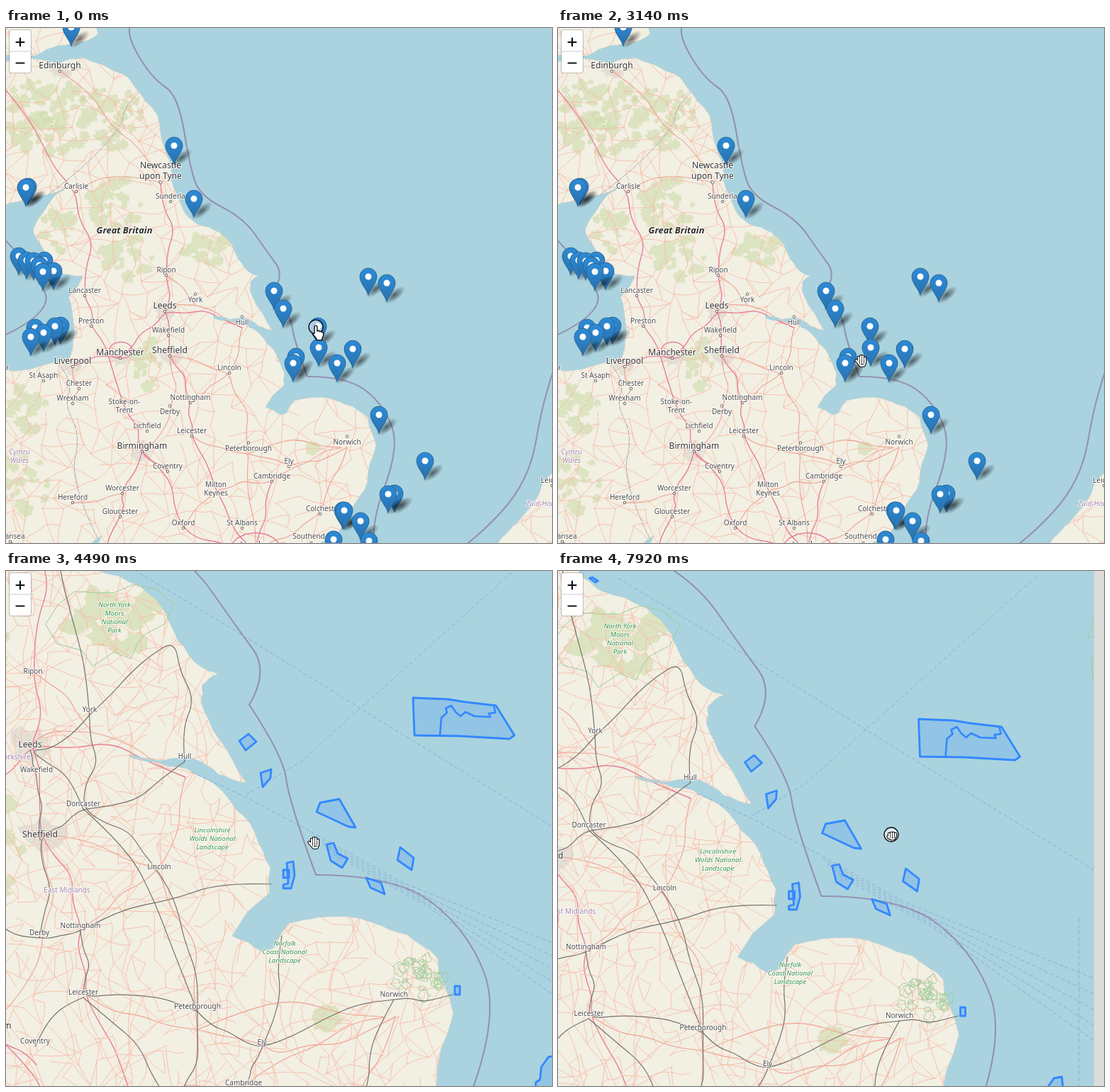
An HTML page that plays this animation: 770x727 px, repeating every 8000 ms.

```html
<!DOCTYPE html>
<html lang="en">
<head>
<meta charset="utf-8">
<title>Wind farm map</title>
<style>
html, body { margin: 0; width: 100%; height: 100%; overflow: hidden; background: #aad3df; }
#stage { display: block; width: 100%; height: 100%; }
path { fill: none; vector-effect: non-scaling-stroke; stroke-linejoin: round; stroke-linecap: round; }
.land { fill: #f2efe3; stroke: #b9cdcb; stroke-width: .7; }
.wood { fill: #cfdcab; opacity: .62; }
.town { fill: #ddd5cd; opacity: .6; }
.sea { stroke: #aad3df; stroke-width: 5; }
.lane { stroke: #f8bea9; stroke-width: .9; }
.trunk { stroke: #f0a18f; stroke-width: 1.1; }
.motorway { stroke: #e67f98; stroke-width: 1.4; }
.border { stroke: #9691b0; stroke-width: 2.1; }
.county { stroke: #aaa5b1; stroke-dasharray: 7 2; }
.rail { stroke: #77746f; stroke-width: 1.2; }
.ferry { stroke: #85a9d4; stroke-width: .9; stroke-dasharray: 5 4; }
.park { stroke: #9fcb98; }
.farm { fill: #3388ff33; stroke: #3388ff; stroke-width: 2.8; }
.label { font: 10px "Noto Sans", "Open Sans", sans-serif; fill: #4a4a4a; text-anchor: middle;
  paint-order: stroke; stroke: #fffc; stroke-width: 2px; stroke-linejoin: round; }
.city { font-size: 12.1px; fill: #333; }
.region { fill: #a386ab; }
.slant { font-style: italic; }
.country { font-size: 12.8px; font-weight: 600; font-style: italic; fill: #2b2b2b; }
.nature { font-size: 9.6px; font-style: italic; fill: #36914a; }
.dot { fill: #fff; stroke: #555; stroke-width: .9; }
.popup text { font: 10.4px "Liberation Sans", Arial, sans-serif; fill: #444; }
.popup .b { font-weight: bold; fill: #222; }
.popup .bg { fill: #fff; filter: drop-shadow(0 3px 6px #0007); }
</style>
</head>
<body>
<svg id="stage" viewBox="0 0 770 727" preserveAspectRatio="none"></svg>
<script>
const random = seed => () => {
  const n = Math.sin(++seed * 127.1 + 3.7) * 43758.5453;
  return n - Math.floor(n);
};
const r1 = n => Math.round(n * 10) / 10;
const pairs = flat => flat.flatMap((v, i) => i % 2 ? [] : [[v, flat[i + 1]]]);
const line = pts => 'M' + pts.map(p => p.map(r1).join(' ')).join('L');
const mid = (a, b) => [(a[0] + b[0]) / 2, (a[1] + b[1]) / 2];

function curve(p) {
  let d = 'M' + p[0];
  for (let i = 1; i < p.length - 1; i++)
    d += `Q${p[i].map(r1)} ${(i == p.length - 2 ? p[i + 1] : mid(p[i], p[i + 1])).map(r1)}`;
  return d;
}

// Splits each run at its midpoint and pushes that point sideways.
function rough(pts, seed, amount = .16) {
  const rnd = random(seed);
  for (let pass = 0; pass < 2; pass++) pts = pts.flatMap((a, i) => {
    const b = pts[i + 1];
    if (!b) return [a];
    const k = (rnd() - .5) * amount, m = mid(a, b);
    return [a, [m[0] - (b[1] - a[1]) * k, m[1] + (b[0] - a[0]) * k]];
  });
  return pts;
}

function blob(x, y, rx, ry, rnd) {
  const n = 16;
  return line(Array.from({ length: n }, (_, i) => {
    const a = i / n * 2 * Math.PI, k = .55 + rnd() * .6;
    return [x + Math.cos(a) * rx * k, y + Math.sin(a) * ry * k];
  })) + 'Z';
}

function scatter(x, y, rx, ry, seed) {
  const rnd = random(seed);
  return Array.from({ length: Math.ceil(rx * ry / 45) + 4 }, () => {
    const a = rnd() * 6.283, k = Math.sqrt(rnd()), size = 3 + rnd() * 8;
    return blob(x + Math.cos(a) * rx * k, y + Math.sin(a) * ry * k, size, size * (.6 + rnd() * .6), rnd);
  }).join('');
}

// A jittered grid of junctions joined by slightly bent lanes.
function lanes(x0, y0, x1, y1, step, share, seed) {
  const rnd = random(seed), cols = Math.ceil((x1 - x0) / step), rows = Math.ceil((y1 - y0) / step);
  const node = Array.from({ length: rows }, (_, j) => Array.from({ length: cols }, (_, i) =>
    [x0 + (i + rnd() * .9) * step, y0 + (j + rnd() * .9) * step]));
  let d = '';
  const join = (a, b) => {
    if (!b || rnd() > share) return;
    d += curve([a.map(r1), mid(a, b).map(v => v + (rnd() - .5) * step * .4), b]);
  };
  node.forEach((row, j) => row.forEach((p, i) => {
    join(p, row[i + 1]);
    join(p, node[j + 1]?.[i]);
    join(p, node[j + 1]?.[i + (rnd() < .5 ? 1 : -1)]);
  }));
  return d;
}

const shape = (cls, d) => `<path class="${cls}" d="${d}"/>`;
const label = (text, x, y, cls = '') => text.split('/').map((part, i) =>
  `<text class="label ${cls}" x="${x}" y="${y + i * 12}" dy=".35em">${part}</text>`).join('');

// Winding routes through named places
const routes = (cls, places, list) => list.map((names, i) =>
  shape(cls, curve(rough(names.split(' ').map(n => places[n]), i + 3, .26)))).join('');
const placesOf = labels => Object.fromEntries(labels.map(([n, x, y]) => [n.split('/')[0], [x, y + 8]]));

// Coast, in wide-view pixels
const northEast = [-30, 50, 75, 50, 108, 42, 165, 65, 183, 85, 213, 122, 217, 140, 232, 190, 241, 235, 258, 268];
const yorkshire = [271, 277, 301, 288, 319, 307, 328, 327, 344, 345, 356, 350, 345, 358, 344, 370, 356, 395, 376, 427, 356, 421, 339, 410, 309, 411];
const wash = [334, 417, 365, 440, 382, 462, 393, 487, 392, 505, 366, 535, 387, 546, 396, 543, 406, 526];
const anglia = [426, 522, 466, 526, 489, 534, 511, 551, 522, 590, 510, 641, 485, 683, 468, 689, 478, 697, 458, 722, 430, 734, 490, 750, 497, 757, 488, 797, 474, 830];
const west = [-30, 830, -30, 784, 73, 777, 128, 735, 135, 717, 98, 742, 58, 752, 3, 732, -30, 737, -30, 482, 55, 475, 90, 465, 95, 415, 88, 380, 108, 350, 75, 345, 45, 300, 38, 285, 70, 235, 90, 222, 20, 245, -30, 250];
const fife = [-30, -20, 118, -20, 130, 8, 100, 22, 65, 28, 35, 40, -30, 43];
const lowlands = [800, 590, 757, 640, 722, 697, 692, 730, 640, 765, 565, 795, 510, 830, 800, 830];
const land = [[...northEast, ...yorkshire, ...wash, ...anglia, ...west], fife, lowlands]
  .map((c, i) => line(rough(pairs(c), i + 4)) + 'Z').join('');

const woods = [[55, 105, 55, 35], [60, 150, 55, 28], [145, 125, 45, 45], [155, 250, 36, 38], [75, 285, 25, 30], [172, 325, 35, 30],
  [283, 311, 36, 20], [200, 475, 18, 36], [28, 535, 28, 35], [25, 640, 35, 45], [430, 597, 9, 9], [300, 770, 70, 16]];
const seaBorder = [174, 0, 172, 15, 207, 72, 243, 95, 260, 200, 275, 238, 335, 268, 369, 317, 392, 348, 378, 372];
const knoll = [378, 372, 402, 408, 406, 440, 425, 492];
const southBorder = [425, 492, 482, 492, 533, 532, 555, 592, 512, 705, 530, 788, 600, 757, 660, 725, 738, 640, 757, 525, 775, 475];
const irishBorder = [-20, 280, 45, 345, 66, 405, -20, 442];
const scotland = [-10, 285, 85, 220, 165, 140, 165, 110, 208, 70];
const wales = [75, 475, 95, 500, 82, 530, 105, 575, 90, 640, 130, 722];
const inlets = [[458, 731, 425, 738, 350, 736], [310, 411, 303, 411, 295, 408], [685, 735, 725, 736, 775, 730], [665, 752, 720, 770, 775, 768]];

const cities = [['Edinburgh', 76, 53], ['Leeds', 224, 392], ['Manchester', 161, 458], ['Sheffield', 231, 455], ['Liverpool', 94, 470],
  ['Birmingham', 192, 590], ['Cardiff', 77, 736], ['Bristol', 129, 758], ['London', 352, 730]];
const towns = [['Carlisle', 99, 223], ['Sunderla', 232, 237], ['Ripon', 226, 341], ['York', 267, 383], ['Lancaster', 111, 370],
  ['Preston', 120, 413], ['Wakefield', 229, 426], ['Hull', 333, 415], ['Lincoln', 315, 479], ['St Asaph', 53, 490], ['Chester', 103, 501],
  ['Wrexham', 94, 522], ['Nottingham', 260, 521], ['Derby', 231, 541], ['Lichfield', 199, 561], ['Leicester', 262, 568], ['Norwich', 481, 584],
  ['Peterborough', 342, 593], ['Ely', 399, 611], ['Cambridge', 375, 632], ['Coventry', 228, 618], ['Worcester', 164, 649], ['Hereford', 94, 662],
  ['Gloucester', 161, 682], ['Oxford', 250, 698], ['St Albans', 333, 698], ['Colchest', 443, 678], ['Swansea', 6, 717], ['Bangor', -13, 479]];
const southTowns = [['Canterbury', 461, 782], ['Wells', 124, 791], ['Salisbury', 201, 797], ['Winchester', 276, 805], ['Oostende', 600, 782],
  ['Brugge', 655, 792], ['Gent', 700, 799], ['Antwerpen', 763, 792], ['Dunkerque', 579, 802], ['Leiden', 770, 638]];
const pairedNames = [['Newcastle', 218, 194, 'city'], ['upon Tyne', 218, 209, 'city'], ['Stoke-on-/Trent', 167, 527], ['Milton/Keynes', 296, 644],
  ['Southend/-on-Sea', 427, 717], ['Great Britain', 167, 286, 'country'], ['Cymru /Wales', 19, 598, 'region slant'],
  ['Zeeland', 705, 744, 'region slant'], ['Zuid-Holland', 762, 671, 'region slant']];
const places = { ...placesOf([...cities, ...towns, ...southTowns, ...pairedNames]), Newcastle: [218, 218], Clyde: [0, 88] };

const base = shape('land', land) + '<g clip-path="url(#shore)">'
  + woods.map((w, i) => shape('wood', scatter(...w, i * 50 + 20))).join('')
  + cities.map(([, x, y], i) => shape('town', blob(x, y + 8, 18, 13, random(i * 20)))).join('')
  + shape('lane', lanes(-30, -20, 800, 830, 24, .62, 7))
  + routes('trunk', places, ['Edinburgh Newcastle', 'Carlisle Newcastle', 'Leeds York Hull', 'Sheffield Lincoln Peterborough London', 'Peterborough Norwich Cambridge',
    'Leicester Peterborough Ely Norwich', 'Nottingham Lincoln Hull', 'Birmingham Derby Sheffield', 'Liverpool Chester Wrexham', 'Hereford Worcester',
    'Norwich Colchest London', 'Oxford Milton Cambridge', 'Ripon York', 'Oostende Brugge Gent Antwerpen'])
  + routes('motorway', places, ['Clyde Carlisle Lancaster Preston Stoke-on- Birmingham Coventry', 'Newcastle Ripon Leeds Sheffield Nottingham Leicester Milton London',
    'Liverpool Manchester Leeds Hull', 'Birmingham Worcester Gloucester Bristol', 'Birmingham Oxford London', 'Swansea Cardiff Bristol London', 'Cambridge London Canterbury'])
  + shape('motorway', blob(352, 738, 40, 28, () => .6)) + shape('motorway', blob(162, 455, 18, 13, () => .6))
  + [scotland, wales].map(c => shape('county', curve(pairs(c)))).join('') + '</g>'
  + inlets.map(c => shape('sea', curve(pairs(c)))).join('')
  + [seaBorder, knoll, southBorder, irishBorder].map(b => shape('border', curve(pairs(b)))).join('');

const dotAbove = ['York', 'Norwich', 'Hull', 'Derby', 'Peterborough'];
const wideLabels = [...towns, ...southTowns, ...cities].map(([n, x, y]) =>
  `<circle class="dot" cx="${x}" cy="${y + (dotAbove.includes(n) ? -7.5 : 8)}" r="1.8"/>`
  + label(n, x, y, cities.some(c => c[0] === n) ? 'city' : '')).join('')
  + '<circle class="dot" cx="218" cy="218" r="2.2"/>' + pairedNames.map(l => label(...l)).join('');

const irishPins = [31, 224, 28, 225, 18, 322, 29, 328, 54, 328, 39, 329, 47, 335, 67, 343, 52, 344, 77, 420, 69, 421, 41, 423, 53, 430, 35, 436];
const northSeaPins = [92, -1, 237, 166, 265, 241, 511, 351, 537, 360, 378, 371, 391, 396, 440, 421, 441, 451, 489, 453, 409, 464, 405, 473, 467, 473];
const southPins = [526, 546, 591, 611, 548, 657, 539, 658, 475, 681, 477, 681, 500, 696, 462, 722, 512, 724];
const pins = [irishPins, northSeaPins, southPins].flatMap(pairs);

// Close view
const closeLabels = [['North York/Moors/National/Park', 153, 48, 'nature'], ['Ripon', 38, 141], ['York', 118, 195], ['Hull', 252, 261], ['Leeds', 34, 245, 'city'],
  ['Yorkshire', 13, 262, 'region'], ['Wakefield', 43, 280], ['Doncaster', 109, 328], ['Sheffield', 48, 372, 'city'], ['Lincolnshire/Wolds National/Landscape', 291, 366, 'nature'],
  ['Lincoln', 216, 417], ['East Midlands', 86, 450, 'region'], ['Nottingham', 105, 500], ['Derby', 47, 510], ['Norfolk/Coast National/Landscape', 393, 526, 'nature'],
  ['Leicester', 109, 594], ['Norwich', 547, 597], ['Peterborough', 270, 614], ['Ely', 361, 665], ['Coventry', 41, 663], ['Cambridge', 335, 722], ['Birmingham', -28, 642, 'city']];
const stops = { ...placesOf(closeLabels), Tees: [65, -80], Scarborough: [238, 98], Skegness: [374, 442], Lynn: [389, 515],
  Bedford: [238, 760], Broads: [630, 598], Stoke: [-80, 505], Ipswich: [500, 760] };
const rails = routes('rail', stops, ['Tees York Doncaster Lincoln Peterborough Bedford', 'York Leeds Doncaster', 'Hull Doncaster Sheffield Derby',
  'York Scarborough Hull', 'Stoke Derby Nottingham Skegness', 'Peterborough Ely Norwich Broads', 'Cambridge Ely Lynn', 'Peterborough Leicester Nottingham',
  'Leicester Coventry', 'Norwich Ipswich', 'Leeds Wakefield Sheffield', 'Doncaster Peterborough', 'Leicester Bedford']);
const ferries = [[740, -22, 415, 270, 340, 315], [150, -20, 300, 70, 545, 222, 821, 392], [262, 284, 340, 320, 430, 368], [800, 460, 800, 740],
  ...[0, 1, 2, 3, 4].map(i => [430 + i * 8, 368 + i * 8, 560 + i * 8, 440 + i * 8, 821, 545 + i * 22])];
const bigFarm = [574, 179, 623, 181, 648, 185, 691, 190, 717, 232, 710, 237, 640, 233, 576, 232];
const reef = [612, 232, 614, 207, 622, 200, 620, 194, 628, 190, 634, 199, 641, 205, 648, 199, 661, 205, 683, 206, 681, 201, 690, 200, 688, 190];
const farms = [[329, 240, 342, 230, 353, 241, 338, 253], [359, 285, 374, 280, 373, 292, 362, 305], [443, 327, 470, 322, 493, 362, 483, 361, 438, 340],
  [452, 386, 462, 384, 468, 399, 482, 406, 474, 419, 458, 409], [556, 390, 575, 405, 572, 422, 552, 408], [508, 433, 529, 440, 534, 456, 514, 447],
  [396, 412, 405, 410, 407, 430, 402, 448, 391, 448, 391, 443, 398, 441], [391, 422, 399, 422, 399, 433, 391, 433], [633, 586, 640, 586, 640, 598, 633, 598],
  [747, 740, 747, 722, 753, 718, 755, 700, 765, 686, 776, 684, 782, 740], [110, -20, 114, -21, 122, -16, 118, -14]];

// Popups
const text = (x, y, str, cls = '', style = '') => `<text x="${x}" y="${y}" dy=".36em" class="${cls}" style="${style}">${str}</text>`;
const rule = (x, y, w) => `<rect x="${x}" y="${y - .6}" width="${w}" height="1.2" fill="#666"/>`;
function table(x, y, w, cols, rows) {
  const h = 14.4;
  return rows.map((row, i) =>
    `<rect x="${x}" y="${y + i * h}" width="${w}" height="${h}" fill="${!i ? '#fff' : i % 2 ? '#c9c9c9' : '#efefef'}" stroke="#b5b5b5" stroke-width=".6"/>`
    + row.map((cell, c) => text(cols[c], y + (i + .5) * h + .3, cell, i ? '' : 'b')).join('')).join('')
    + `<rect x="${x}" y="${y}" width="${w}" height="${h * rows.length}" fill="none" stroke="#8a8a8a"/>`;
}
function popup(id, x, y, w, h, body) {
  const m = x + w / 2, r = x + w - 12;
  return `<g id="${id}" class="popup"><g class="bg"><rect x="${x}" y="${y}" width="${w}" height="${h}" rx="12"/>`
    + `<path style="fill:#fff" d="M${m - 12} ${y + h - 1}l12 10l12-10Z"/></g>`
    + text(x + 21, y + 23.5, 'Dorvan Shoal', 'b', 'font-size:14px')
    + `<path d="M${r - 3.6} ${y + 8.4}l7.2 7.2m0-7.2l-7.2 7.2" stroke="#777" stroke-width="1.3"/>${body}</g>`;
}
const hourly = [697.6, 698.1, 698.9, 699.7, 699, 698.4, 699.3, 698.1, 682.8, 623.9, 603.3, 580.2, 558.5, 520.3, 482.9, 444.7];
let total = 0;
const hours = hourly.map((v, i) => [i, v, r1(total += v)]);
const days = [81.65, 79.59, 50.46, 33.82, 70.37, 61.86, 63.08, 81.67, 81.6, 72.32].map((v, i) =>
  [['Sun', 'Mon', 'Tue', 'Wed', 'Thu', 'Fri', 'Sat'][(15 - i) % 7] + `, ${28 - i} Oct 2024`, v + '%']);

const hourPopup = popup('hourPopup', 348, 39, 184, 363,
  text(369, 80, '28/10/2024, 15:00:00', '', 'font-style:italic;fill:#666') + rule(369, 91.5, 138)
  + text(369, 103.5, '<tspan class="b">Output:</tspan> 444.7 (51.89%)', '', 'font-size:12.7px')
  + text(369, 120, '<tspan class="b">Monthly Avg:</tspan> 39.16%', '', 'font-size:12.7px') + rule(369, 131.5, 138)
  + table(369.5, 142.5, 137, [378, 415, 462], [['Hour', 'Output', 'Total'], ...hours]));
const dayPopup = popup('dayPopup', 353, 87, 214, 243,
  rule(374, 123, 167) + text(374, 136, '<tspan style="font-weight:bold">Turbines:</tspan> 90 x RKD Holven d152-8.5', '', 'fill:#666') + rule(374, 147, 167)
  + table(374.5, 158, 167, [383, 479], [['Day', 'Max Output'], ...days]));

// Pointer shapes
const hand = d => `<path d="${d}" stroke="#000" stroke-width="4.4"/><path d="${d}" stroke="#fff" stroke-width="2.3"/><path d="M-1.5 1v4m3-4v4m3-4v4" stroke="#000" stroke-width=".7"/>`;
const cursors = {
  point: '<path style="fill:#fff" stroke="#000" stroke-width="1.3" d="M-2 0a1.9 1.9 0 0 1 3.8 0v6q3-1.5 3.6 .7q2.6-1 3 .8q2.2-.3 2.2 1.8v3l-2 4.5v1.8h-7.6v-1.6l-5-6.5q-.8-2.4 2-1.3z"/>',
  arrow: '<path style="fill:#000" stroke="#fff" d="M0 0v15l3.5-3.3 2.3 5.5 2.4-1-2.3-5.3h5z"/>',
  open: hand('M-3 4V-4M0 3V-6M3 3V-5.5M6 4V-3M-6.5 0l4 5M-2 4h7.5l-1 3.5h-5z'),
  fist: hand('M-3 2V-1M0 2V-2M3 2V-2M6 2V-1M-4.5 3l2 2M-2 3h7l-1 3h-4.5z')
};

const $ = id => document.getElementById(id);
$('stage').innerHTML = `<defs>
  <clipPath id="shore"><path d="${land}"/></clipPath>
  <linearGradient id="blue" x2="0" y2="1"><stop stop-color="#2e8bd6"/><stop offset="1" stop-color="#2871ae"/></linearGradient>
  <radialGradient id="shade"><stop stop-color="#000" stop-opacity=".55"/><stop offset="1" stop-color="#000" stop-opacity="0"/></radialGradient>
  <g id="base">${base}</g>
  <g id="pin"><ellipse cx="11" cy="17" rx="18" ry="7.5" transform="rotate(-38 11 17)" fill="url(#shade)"/>
    <path d="M0 26C-3 17-12 9-12 0A12 12 0 0 1 12 0C12 9 3 17 0 26Z" style="fill:url(#blue)" stroke="#2a6797"/><circle r="4.5" fill="#fff"/></g>
</defs>
<rect width="770" height="727" fill="#aad3df"/>
<g id="wide"><g id="wideMap"><use href="#base"/>${wideLabels}</g>${pins.map(() => '<use class="pin" href="#pin"/>').join('')}</g>
<g id="close">
  <g transform="translate(-413 -555) scale(2)"><use href="#base"/><g clip-path="url(#shore)">${shape('lane', lanes(200, 260, 530, 660, 11, .42, 31))}</g></g>
  ${shape('park', blob(152, 75, 84, 70, random(3)))}${shape('park', scatter(585, 575, 36, 30, 5))}
  ${rails}${ferries.map(f => shape('ferry', line(pairs(f)))).join('')}
  ${closeLabels.map(l => label(...l)).join('')}
  ${[bigFarm, ...farms].map(f => shape('farm', line(pairs(f)) + 'Z')).join('')}
  <path d="${line(pairs(reef))}" stroke="#3388ff" stroke-width="2.6"/>
  <rect x="821.5" y="-60" width="100" height="900" fill="#dddcda"/>
  <path class="park" d="M821 38l-8 27l8-3M821 92l-4 1l3 33"/>
</g>
${hourPopup}${dayPopup}
<rect x="4" y="2" width="32" height="62" rx="4" fill="#0003"/><rect x="5" y="3" width="30" height="60" rx="3" fill="#fff"/>
<path d="M5 33H35" stroke="#ccc"/><path d="M14.5 20h11M20 14.5v11M14.5 49.5h11" stroke="#111" stroke-width="2.2"/>
<g id="cursor"><circle id="ring" r="10" fill="#fff9" stroke="#111" stroke-width="1.4"/>${Object.entries(cursors).map(([k, v]) => `<g id="${k}">${v}</g>`).join('')}</g>`;

const pinNodes = [...document.querySelectorAll('.pin')];
const lastKey = (keys, t) => keys.findLastIndex(k => k[0] <= t);
function tween(keys, t) {
  const i = lastKey(keys, t), a = keys[i], b = keys[i + 1] || a;
  const f = a === b ? 0 : (t - a[0]) / (b[0] - a[0]);
  return a.slice(1).map((v, j) => v + (b[j + 1] - v) * f);
}
const held = (keys, t) => keys[lastKey(keys, t)][1];

const pointer = [[0, 437, 422], [890, 437, 422], [1340, 505, 103], [1790, 521, 54], [2390, 521, 54], [3140, 427, 469], [3440, 425, 469],
  [3590, 429, 438], [3740, 437, 382], [4040, 437, 382], [4490, 434, 383], [4640, 434, 383], [5390, 460, 338], [6290, 460, 338],
  [6890, 553, 98], [7180, 553, 98], [7470, 536, 342], [7620, 522, 348], [7920, 470, 372]];
const cursorKind = [[0, 'point'], [1190, 'arrow'], [1790, 'point'], [2540, 'open'], [3440, 'fist'], [3890, 'open'], [5240, 'point'],
  [6440, 'arrow'], [6890, 'point'], [7330, 'open'], [7470, 'fist']];
const clicks = [[0, 140], [2090, 2540], [3440, 3890], [5540, 5690], [7180, 7330], [7470, 8000]];
const widePan = [[0, 0, 0], [3440, 0, 0], [3590, 4, -31], [3740, 12, -86.5]];
const zoom = [[0, 1], [3890, 1], [4040, 1.6], [4190, 2]];
const closePan = [[0, 0, 0], [7470, 0, 0], [7620, -14, 6], [7920, -65.5, 30]];
const hourFade = [[0, 0], [140, .65], [290, 1], [2540, .4], [2690, 0]];
const dayFade = [[0, 0], [5690, .65], [5840, 1], [7330, .4], [7470, 0]];

// The picture advances in 150 ms steps, with a shorter one late in the loop.
const stepTime = t => t < 140 ? 0 : t < 7180 ? 140 + 150 * Math.floor((t - 140) / 150)
  : t < 7470 ? 7180 + 150 * Math.floor((t - 7180) / 150) : 7470 + 150 * Math.floor((t - 7470) / 150);

function draw(t) {
  const [px, py] = tween(widePan, t), [s] = tween(zoom, t);
  const ox = px * s + (1 - s) * 437, oy = py * s + (1 - s) * 382, isClose = t >= 4340;
  $('wide').style.display = isClose ? 'none' : '';
  $('close').style.display = isClose ? '' : 'none';
  $('wideMap').setAttribute('transform', `translate(${ox} ${oy}) scale(${s})`);
  pinNodes.forEach((n, i) => {
    const [x, y] = pins[i];
    n.setAttribute('transform', `translate(${x * s + ox} ${(y + 26) * s + oy - 26})`);
  });
  $('close').setAttribute('transform', `translate(${tween(closePan, t)})`);
  $('hourPopup').style.opacity = held(hourFade, t);
  $('dayPopup').style.opacity = held(dayFade, t);
  $('cursor').setAttribute('transform', `translate(${tween(pointer, t)})`);
  const kind = held(cursorKind, t);
  for (const k in cursors) $(k).style.display = k === kind ? '' : 'none';
  $('ring').style.display = clicks.some(([a, b]) => t >= a && t < b) ? '' : 'none';
}

let shown = -1;
function tick() {
  const t = stepTime(performance.now() % 8000);
  if (t !== shown) draw(shown = t);
  requestAnimationFrame(tick);
}
tick();
</script>
</body>
</html>
```
